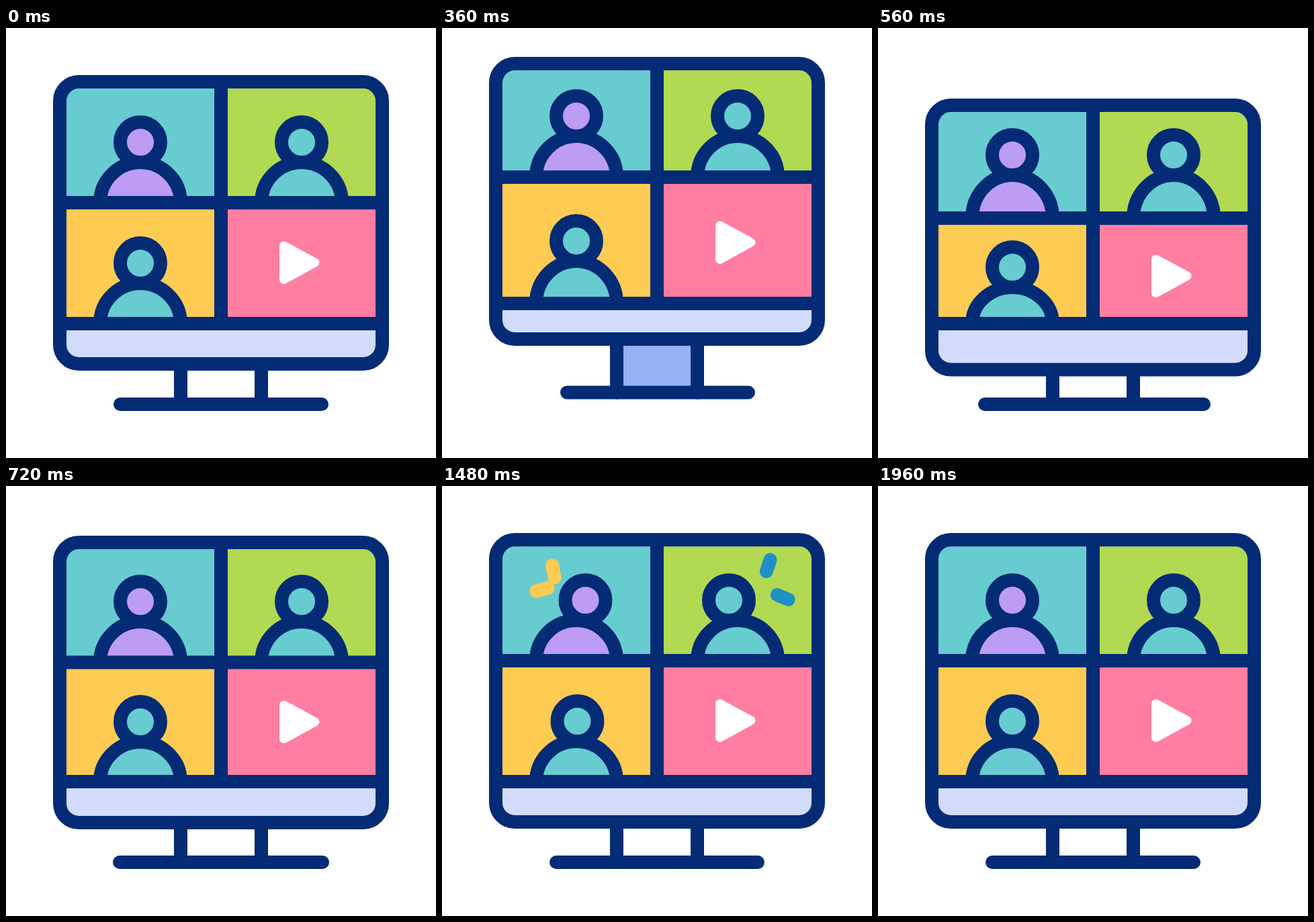
These frames come from a looping animation (640x640 px, 2000 ms). An HTML page with a canvas:

```html
<!DOCTYPE html>
<html lang="en">
<head>
<meta charset="utf-8">
<title>Video call monitor</title>
<style>
  html, body { margin: 0; height: 100%; overflow: hidden; background: #fff; }
  canvas { display: block; width: 100vmin; height: 100vmin; }
</style>
</head>
<body>
<canvas id="stage" width="640" height="640"></canvas>
<script>
const LOOP = 2000, STEP = 40;
const NAVY = '#042b76', TEAL = '#67ccd0', GREEN = '#b1da52', YELLOW = '#fecb53',
      PINK = '#ff7ea1', LILAC = '#bd9cf3', BAR = '#d1dcfc', STAND = '#95b3f4', BLUE = '#1e90c4';
const c = document.getElementById('stage').getContext('2d');

// Monotone cubic curve through the keys; flat at peaks and at both ends.
function curve(times, values) {
  const last = times.length - 1;
  const slope = i => (values[i + 1] - values[i]) / (times[i + 1] - times[i]);
  const tangent = values.map((_, i) => {
    if (i === 0 || i === last) return 0;
    const a = slope(i - 1), b = slope(i);
    return a * b <= 0 ? 0 : 2 * a * b / (a + b);
  });
  return t => {
    if (t <= times[0]) return values[0];
    if (t >= times[last]) return values[last];
    const i = times.findIndex(k => k > t) - 1;
    const h = times[i + 1] - times[i], u = (t - times[i]) / h, v = 1 - u;
    return v * v * (1 + 2 * u) * values[i] + u * u * (3 - 2 * u) * values[i + 1]
      + h * u * v * (v * tangent[i] - u * tangent[i + 1]);
  };
}

// Jump, landing squash and settling, as offsets from the resting place.
const hop = (rest, ...offsets) => {
  const offset = curve([80, 320, 360, 560, 720, 780], [0, ...offsets, 0]);
  return t => rest + offset(t);
};
const pose = {
  top: hop(80, -32, -27, 35, 4),
  mid: hop(260, -38, -38, 23, 2.5),
  line: hop(440, -30, -30, 0, 0),
  bottom: hop(500, -37, -37, 8.5, 1),
  upperHead: hop(170, -38, -39, 19, 2),
  lowerHead: hop(350, -33, -33, 6, 1),
  play: hop(349, -30, -30, 20, 2),
  base: hop(560, -17.5, -17.5, 0, 0),
  baseLeft: hop(170, 16, 16, -11, -1),
  baseRight: hop(470, -14, -14, 15, 1)
};

const sway = {
  lilac: curve([1180, 1420, 1480, 1940], [0, 14, 13.5, 0]),
  right: curve([1040, 1160, 1360, 1480, 1970], [0, -5, -14.5, -13, 0]),
  lower: curve([760, 1040, 1160, 1480, 1600], [0, 13.5, 11, 1.5, 0])
};

const sparks = [
  { x: 167, y: 337, start: 954, color: PINK, angles: [235.5, 147] },
  { x: 170, y: 148.5, start: 1300, color: YELLOW, angles: [259, 165] },
  { x: 474.5, y: 152, start: 1220, color: BLUE, angles: [-71.5, 22.4] }
];

function block(color, x, y, right, bottom) {
  c.fillStyle = color;
  c.fillRect(x, y, right - x, bottom - y);
}

function stroke(color, width, ...points) {
  c.strokeStyle = color;
  c.lineWidth = width;
  c.beginPath();
  points.forEach(([x, y]) => c.lineTo(x, y));
  c.stroke();
}

function drawSpark({ x, y, start, color, angles }, t) {
  const reach = 48, age = (t - start) / 280;
  const clamp = u => reach * Math.min(1, Math.max(0, u));
  const outer = clamp(age), inner = clamp(age - 0.38), length = outer - inner;
  if (length <= 0) return;
  for (const degrees of angles) {
    const a = degrees * Math.PI / 180, dx = Math.cos(a), dy = Math.sin(a);
    stroke(color, 20 * Math.min(1, length / 10),
      [x + dx * inner, y + dy * inner], [x + dx * outer, y + dy * outer]);
  }
}

function drawPerson(x, headY, floor, shift, color) {
  c.fillStyle = color;
  c.strokeStyle = NAVY;
  c.lineWidth = 20;
  c.lineCap = 'butt';
  c.beginPath();
  c.arc(x + shift, headY, 30, 0, 2 * Math.PI);
  c.fill();
  c.stroke();
  c.beginPath();
  c.ellipse(x, floor, 60, floor - headY - 30, 0, Math.PI, 2 * Math.PI);
  c.fill();
  c.stroke();
  c.lineCap = 'round';
}

function drawPlay(y) {
  c.fillStyle = '#fff';
  c.strokeStyle = '#fff';
  c.lineWidth = 13;
  c.lineJoin = 'round';
  c.beginPath();
  c.moveTo(413.5, y - 25);
  c.lineTo(413.5, y + 25.5);
  c.lineTo(460, y);
  c.closePath();
  c.fill();
  c.stroke();
}

function draw(t) {
  const p = {};
  for (const key in pose) p[key] = pose[key](t);
  block('#fff', 0, 0, 640, 640);
  c.lineCap = 'round';

  // The stand is only tinted while the monitor is in the air.
  if (p.base < 559) block(STAND, 260, p.bottom, 380, p.base);
  for (const x of [260, 380]) stroke(NAVY, 20, [x, p.bottom], [x, p.base]);
  stroke(NAVY, 20, [p.baseLeft, p.base], [p.baseRight, p.base]);

  const frame = new Path2D();
  frame.roundRect(80, p.top, 480, p.bottom - p.top, 28.5);
  c.save();
  c.clip(frame);
  block(TEAL, 80, p.top, 320, p.mid);
  block(GREEN, 320, p.top, 560, p.mid);
  block(YELLOW, 80, p.mid, 320, p.line);
  block(PINK, 320, p.mid, 560, p.line);
  block(BAR, 80, p.line, 560, p.bottom);
  sparks.forEach(s => drawSpark(s, t));
  drawPerson(200, p.upperHead, p.mid, sway.lilac(t), LILAC);
  drawPerson(440, p.upperHead, p.mid, sway.right(t), TEAL);
  drawPerson(200, p.lowerHead, p.line, sway.lower(t), TEAL);
  drawPlay(p.play);
  stroke(NAVY, 20, [80, p.mid], [560, p.mid]);
  stroke(NAVY, 20, [80, p.line], [560, p.line]);
  stroke(NAVY, 20, [320, p.top], [320, p.line]);
  c.restore();
  c.strokeStyle = NAVY;
  c.lineWidth = 20;
  c.stroke(frame);
}

const begin = performance.now();
function tick() {
  const t = (performance.now() - begin) % LOOP;
  draw(Math.floor(t / STEP) * STEP);
  requestAnimationFrame(tick);
}
tick();
</script>
</body>
</html>
```
